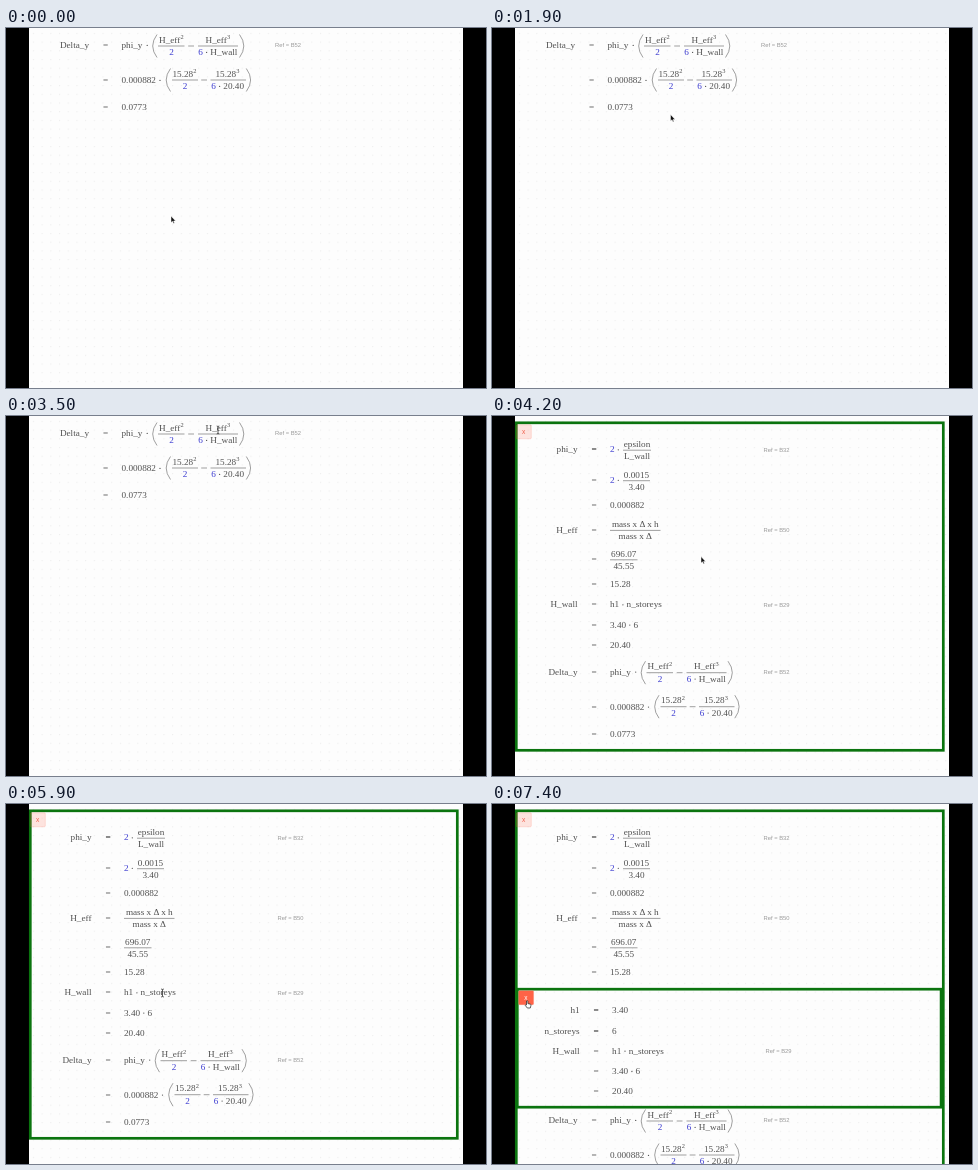
An HTML page for the animation above (7.5 s loop, 480 by 360 pixels).

```html
<!DOCTYPE html>
<html lang="en">
<head>
<meta charset="utf-8">
<title>Expanding calculation</title>
<style>
html, body { margin: 0; width: 100%; height: 100%; overflow: hidden; background: #000; }
svg { display: block; width: 480px; height: 360px; }
text { font: 9.2px "Liberation Serif", "Times New Roman", serif; fill: #505050; white-space: pre; }
text.num { fill: #3a3ad0; }
text.sup { font-size: 6.4px; }
text.ref { font: 5.8px "Liberation Sans", Arial, sans-serif; fill: #999; }
text.close { font: 6.6px "Liberation Sans", Arial, sans-serif; text-anchor: middle; fill: #f0604c; }
.rule { stroke: #777; stroke-width: .7; fill: none; }
.panel { fill: none; stroke: #0b740f; stroke-width: 2.7; }
</style>
</head>
<body>
<svg viewBox="0 0 480 360">
  <defs>
    <pattern id="dots" width="8.7" height="8.7" x="23" y="1" patternUnits="userSpaceOnUse">
      <rect x="4" y="4" width="1" height="1" fill="#e9e9e9"/>
    </pattern>
  </defs>
  <rect width="480" height="360" fill="#000"/>
  <rect x="23" width="434" height="360" fill="#fdfdfd"/>
  <rect x="23" width="434" height="360" fill="url(#dots)"/>
  <g id="scenes"></g>
  <g id="cursor">
    <path id="arrow" d="M0 0V6.6L1.5 5.3L2.5 7.5L3.5 7L2.6 5H4.6Z" fill="#111" stroke="#fff" stroke-width=".5"/>
    <path id="beam" d="M-1.3 -4Q0 -4 0 -3Q0 -4 1.3 -4M0 -3V3M-1.3 4Q0 4 0 3Q0 4 1.3 4" fill="none" stroke="#333" stroke-width=".8"/>
    <path id="hand" d="M0 0Q.8 -1 1.4 0V2.6L4 3.2Q4.6 3.5 4.4 4.6L3.8 7H.8L-1.2 4.4Q-1.2 3.4 0 4Z" fill="#fff" stroke="#222" stroke-width=".7"/>
  </g>
</svg>
<script>
const LOOP = 7500, OPEN_ALL = 3700, OPEN_WALL = 6200, HOVER_CLOSE = 7150;
const $ = id => document.getElementById(id);

const text = (x, y, s, cls = "", anchor = "start") =>
  `<text x="${x}" y="${y}" class="${cls}" text-anchor="${anchor}">${s}</text>`;
const path = d => `<path class="rule" d="${d}"/>`;
const at = (x, y, body) => `<g transform="translate(${x} ${y})">${body}</g>`;
const dot = (x, y) => `<circle cx="${x}" cy="${y - 2.6}" r=".65" fill="#555"/>`;
const equals = y => text(97, y, "=");
const line = (y, s) => equals(y) + text(115.5, y, s);
const named = (y, name) => text(83, y, name, "", "end") + equals(y);
const ref = (y, cell) => text(269, y - .8, `Ref = ${cell}`, "ref");
const bar = (x1, x2, y) => path(`M${x1} ${y}H${x2}`);
const fraction = (x1, x2, y, top, bottom, cls = "") => {
  const mid = (x1 + x2) / 2;
  return bar(x1, x2, y - 2.2) + text(mid, y - 5.4, top, "", "middle") + text(mid, y + 6.6, bottom, cls, "middle");
};
const power = (x, y, base, exp, width) => text(x, y, base) + text(x + width, y - 3.8, exp, "sup");
const paren = (x, y, dir) => {
  const mid = y - 2, a = x + dir * 5;
  return path(`M${a} ${mid - 11.5}Q${x - dir * 3.6} ${mid} ${a} ${mid + 11.5}`);
};
const product = (x, y, a, b, width, cls = "") =>
  text(x, y, a, cls) + dot(x + width + 3.7, y) + text(x + width + 7.4, y, b);

const delta = named(20, "Delta_y") + text(115.5, 20, "phi_y") + dot(141.2, 20) +
  paren(146, 20, 1) + bar(152, 178.5, 18) + power(153, 14.8, "H_eff", 2, 21.4) +
  text(165.5, 27, "2", "num", "middle") + bar(182.2, 188, 18) +
  bar(192, 232, 18) + power(199.5, 14.8, "H_eff", 3, 21.4) +
  product(192.3, 27, "6", "H_wall", 4.6, "num") + paren(238.5, 20, -1) + ref(20, "B52") +
  equals(55) + text(115.5, 55, "0.000882") + dot(154, 55) +
  paren(159.5, 54, 1) + bar(166, 192, 52) + power(166.5, 48.8, "15.28", 2, 20.7) +
  text(179, 61, "2", "num", "middle") + bar(195.2, 201, 52) +
  bar(204.5, 240, 52) + power(209.5, 48.8, "15.28", 3, 20.7) +
  product(205.3, 61, "6", "20.40", 4.6, "num") + paren(245.3, 54, -1) +
  line(82.2, "0.0773");

const wall = y => named(y, "H_wall") + product(115.5, y, "h1", "n_storeys", 9.2) + ref(y, "B29") +
  equals(y + 20.3) + product(115.5, y + 20.3, "3.40", "6", 16.1) + line(y + 40.6, "20.40");

const twice = y => equals(y) + text(115.5, y, "2", "num") + dot(123.8, y);
const upper =
  named(36.4, "phi_y") + twice(36.4) + fraction(128.5, 156.5, 36.4, "epsilon", "L_wall") + ref(36.4, "B32") +
  twice(66.9) + fraction(128.5, 155.5, 66.9, "0.0015", "3.40") +
  line(91.5, "0.000882") +
  named(116.6, "H_eff") + fraction(115.5, 166, 116.6, "mass x Δ x h", "mass x Δ") + ref(116.6, "B50") +
  equals(146) + fraction(115.5, 143, 146, "696.07", "45.55") +
  line(171.2, "15.28");

const panel = (x, y, w, h) => `<rect class="panel" x="${x}" y="${y}" width="${w}" height="${h}"/>`;
const closeButton = (x, y, id) =>
  `<rect id="${id}" x="${x}" y="${y}" width="15" height="14" rx="1" fill="#ff6347" fill-opacity=".17" stroke="#ff6347" stroke-opacity=".25" stroke-width=".7"/>` +
  text(x + 7.3, y + 9.3, "x", "close", "middle").replace("<text", `<text id="${id}X"`);

const outer = h => panel(24.3, 6.8, 427, h) + closeButton(24.3, 8.8, `outer${h}`);
const inputs = named(209.2, "h1") + line(209.2, "3.40") + named(229.7, "n_storeys") + line(229.7, "6");

const scenes = [
  delta,
  outer(327.5) + at(2.5, 0, upper + wall(191.4)) + at(2.5, 238.7, delta),
  outer(370) + at(2.5, 0, upper) + at(2.5, 299, delta) +
    panel(25.3, 185.2, 423.8, 118) + at(4.6, 0, inputs + wall(249.8)) + closeButton(26.6, 186.7, "inner")
];
$("scenes").innerHTML = scenes.map((s, i) => `<g id="scene${i}">${s}</g>`).join("");

// Pointer stops: time, x, y
const stops = [
  [0, 165, 188], [300, 165, 188], [1100, 171, 130], [1700, 178.5, 86.5], [2300, 178.5, 86.5],
  [3100, 212, 14], [3750, 212, 14], [4150, 209, 140.5], [4800, 209, 140.5],
  [5600, 156.5, 189], [6250, 156.5, 189], [6400, 156.5, 191], [6650, 156.5, 191],
  [7250, 34.5, 197], [LOOP, 34.5, 197]
];
const ease = u => u * u * (3 - 2 * u);
function pointer(t) {
  const i = stops.findIndex(s => s[0] > t);
  const [t0, x0, y0] = stops[i - 1], [t1, x1, y1] = stops[i];
  const u = ease((t - t0) / (t1 - t0));
  return [x0 + (x1 - x0) * u, y0 + (y1 - y0) * u];
}
const show = (id, on) => $(id).setAttribute("display", on ? "inline" : "none");

function render(t) {
  const current = t < OPEN_ALL ? 0 : t < OPEN_WALL ? 1 : 2;
  scenes.forEach((_, i) => show(`scene${i}`, i === current));

  const hover = t >= HOVER_CLOSE;
  $("inner").setAttribute("fill-opacity", hover ? 1 : .17);
  $("innerX").style.fill = hover ? "#fff" : "";

  const overText = (t > 2950 && t < OPEN_ALL) || (t > 5450 && t < OPEN_WALL);
  show("beam", overText);
  show("hand", hover);
  show("arrow", !overText && !hover);
  $("cursor").setAttribute("transform", `translate(${pointer(t).join(" ")})`);
}

const start = performance.now();
function tick() {
  render((performance.now() - start) % LOOP);
  requestAnimationFrame(tick);
}
tick();
</script>
</body>
</html>
```
